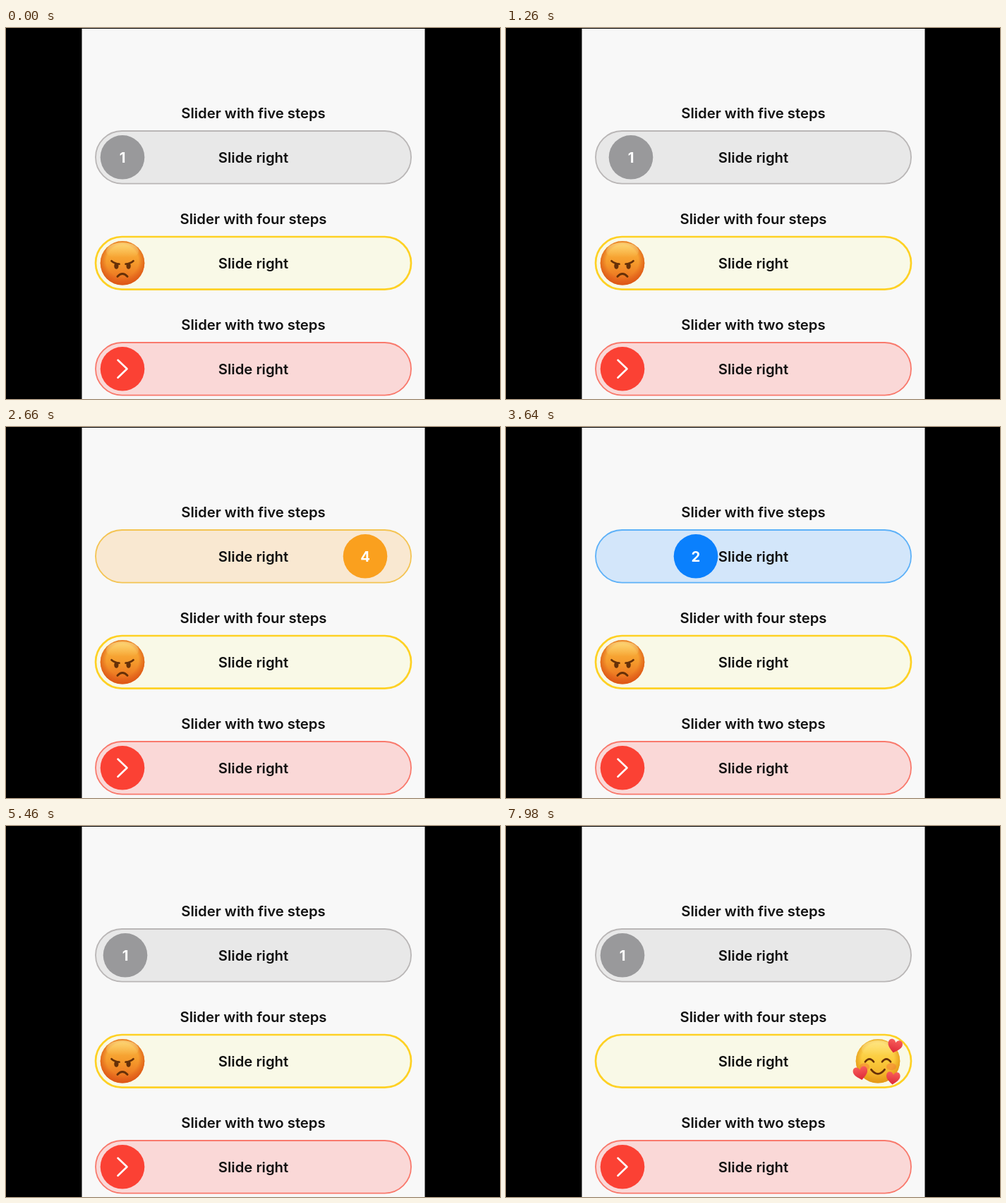
An HTML page with a canvas that plays this animation: 700x526 px, repeating every 8 s.

```html
<!DOCTYPE html>
<html lang="en">
<head>
<meta charset="utf-8">
<title>Step sliders</title>
<style>
  html, body { margin: 0; width: 100%; height: 100%; overflow: hidden; background: #000; }
  canvas { display: block; width: 700px; height: 526px; }
</style>
</head>
<body>
<canvas id="stage" width="700" height="526"></canvas>
<script>
const ctx = document.getElementById('stage').getContext('2d');
const LOOP = 8000, TICK = 140;
const START = 165, END = 536, RADIUS = 31.3;
const TAU = Math.PI * 2;
const BROWN = '#663008';

// [time in ms, knob centre x]
const numberPath = [
  [1120, 165], [1260, 177], [1400, 216], [1680, 350], [1960, 497], [2100, 536],
  [2240, 536], [2380, 532], [2520, 523], [2660, 509], [3640, 269],
  [4060, 215], [4620, 186], [5460, 169], [5600, 165]
];
const facePath = [
  [6440, 165], [6580, 186], [6720, 250], [6860, 319], [7280, 420], [7700, 497], [7980, 527]
];

const numberSteps = [
  { knob: '#99999b', fill: '#e8e8e8', edge: '#b9b6b6' },
  { knob: '#0a80fd', fill: '#d3e6fa', edge: '#5db1f8' },
  { knob: '#34c759', fill: '#d9f1df', edge: '#78d890' },
  { knob: '#faa01e', fill: '#f9e8d1', edge: '#f4c453' },
  { knob: '#fb4134', fill: '#fad8d7', edge: '#f9796c' }
];

function along(path, t) {
  if (t <= path[0][0]) return path[0][1];
  for (let i = 1; i < path.length; i++) {
    const [t0, x0] = path[i - 1], [t1, x1] = path[i];
    if (t <= t1) return x0 + (x1 - x0) * (t - t0) / (t1 - t0);
  }
  return path[path.length - 1][1];
}

const stepAt = (x, count) => Math.floor((x - START) / (END - START) * (count - 1));

function text(str, x, y, color = '#111', weight = 600) {
  ctx.font = `${weight} 20.3px Inter, sans-serif`;
  ctx.textAlign = 'center';
  ctx.fillStyle = color;
  ctx.fillText(str, x, y);
}

function disc(x, y, r, fill) {
  ctx.fillStyle = fill;
  ctx.beginPath();
  ctx.arc(x, y, r, 0, TAU);
  ctx.fill();
}

function oval(x, y, rx, ry, fill) {
  ctx.fillStyle = fill;
  ctx.beginPath();
  ctx.ellipse(x, y, rx, ry, 0, 0, TAU);
  ctx.fill();
}

// Quadratic stroke; a straight line when the control point is on it.
function curve(x0, y0, cx, cy, x1, y1, width, color = BROWN) {
  ctx.strokeStyle = color;
  ctx.lineWidth = width;
  ctx.lineCap = 'round';
  ctx.beginPath();
  ctx.moveTo(x0, y0);
  ctx.quadraticCurveTo(cx, cy, x1, y1);
  ctx.stroke();
}

function ball(top, middle, bottom, rim) {
  const body = ctx.createLinearGradient(0, -RADIUS, 0, RADIUS);
  body.addColorStop(0, top);
  body.addColorStop(0.5, middle);
  body.addColorStop(1, bottom);
  disc(0, 0, RADIUS, body);
  const shade = ctx.createRadialGradient(0, -3, RADIUS * 0.72, 0, -1, RADIUS + 1);
  shade.addColorStop(0, rim + '00');
  shade.addColorStop(1, rim + 'cc');
  disc(0, 0, RADIUS, shade);
  const gloss = ctx.createLinearGradient(0, -29, 0, -8);
  gloss.addColorStop(0, '#ffe99a99');
  gloss.addColorStop(1, '#ffe99a00');
  oval(0, -17, 23, 12, gloss);
}

function heart(x, y, size, angle) {
  ctx.save();
  ctx.translate(x, y);
  ctx.rotate(angle);
  ctx.scale(size, size);
  const red = ctx.createLinearGradient(0, -1, 0, 1);
  red.addColorStop(0, '#fa625c');
  red.addColorStop(1, '#dc2637');
  ctx.fillStyle = red;
  ctx.beginPath();
  ctx.moveTo(0, 0.95);
  ctx.bezierCurveTo(-0.5, 0.55, -1, 0.2, -1, -0.3);
  ctx.bezierCurveTo(-1, -1, -0.2, -1.05, 0, -0.45);
  ctx.bezierCurveTo(0.2, -1.05, 1, -1, 1, -0.3);
  ctx.bezierCurveTo(1, 0.2, 0.5, 0.55, 0, 0.95);
  ctx.fill();
  ctx.restore();
}

function angryFace() {
  ball('#fbbd43', '#f59a2c', '#e8641d', '#da5314');
  for (const side of [-1, 1]) {
    oval(side * 8.6, 4, 3.1, 4.4, BROWN);
    curve(side * 15.5, -3, side * 11, 1, side * 4.5, 1.4, 2.7);
  }
  curve(-7, 19, 0, 11.5, 7, 19, 3);
}

function neutralFace() {
  ball('#fde26a', '#fbcb3a', '#eda31d', '#e29414');
  for (const side of [-1, 1]) oval(side * 9.8, -6.5, 3.4, 5, BROWN);
  curve(-14.5, 10, 0, 10, 14.5, 10, 2.8);
}

function lovingFace() {
  ball('#fde064', '#fbca3b', '#eda421', '#e29414');
  for (const side of [-1, 1]) {
    oval(side * 19, 8, 7, 5, '#f37a3580');
    curve(side * 18, 1, side * 12, -7, side * 6, 1, 2.7);
  }
  curve(-9.5, 12, 0, 24, 9.5, 12, 2.8);
  heart(24, -21.5, 10.3, 0.25);
  heart(-24.5, 17, 10.3, -0.2);
  heart(21.5, 24, 9.8, 0.1);
}

const faces = [angryFace, neutralFace, lovingFace, lovingFace];

function slider(title, y, fill, edge, width) {
  text(title, 350.5, y - 55.5);
  ctx.beginPath();
  ctx.roundRect(127, y - 37.3, 447, 74.6, 37.3);
  ctx.fillStyle = fill;
  ctx.fill();
  ctx.strokeStyle = edge;
  ctx.lineWidth = width;
  ctx.stroke();
  text('Slide right', 350.5, y + 7.5);
}

function numberSlider(t) {
  const y = 183.3, x = along(numberPath, t);
  const step = stepAt(x, numberSteps.length);
  const { knob, fill, edge } = numberSteps[step];
  slider('Slider with five steps', y, fill, edge, 1.8);
  disc(x, y, RADIUS, knob);
  text(step + 1, x, y + 7.5, '#fff', 650);
}

function faceSlider(t) {
  const y = 333.3, x = along(facePath, t);
  slider('Slider with four steps', y, '#f9f9e7', '#fed124', 2.7);
  ctx.save();
  ctx.translate(x, y);
  faces[stepAt(x, faces.length)]();
  ctx.restore();
}

function arrowSlider() {
  const y = 483.3;
  slider('Slider with two steps', y, '#fad8d7', '#f9796c', 1.8);
  disc(START, y, RADIUS, '#fb4134');
  ctx.strokeStyle = '#fff';
  ctx.lineWidth = 2.6;
  ctx.lineCap = ctx.lineJoin = 'round';
  ctx.beginPath();
  ctx.moveTo(158.5, y - 12.5);
  ctx.lineTo(171.5, y);
  ctx.lineTo(158.5, y + 12.5);
  ctx.stroke();
}

function draw(now) {
  const t = Math.floor(now % LOOP / TICK) * TICK;
  ctx.fillStyle = '#000';
  ctx.fillRect(0, 0, 700, 526);
  ctx.fillStyle = '#f8f8f8';
  ctx.fillRect(107.5, 1, 486, 525);
  numberSlider(t);
  faceSlider(t);
  arrowSlider();
}

let origin;
function frame(now) {
  origin ??= now;
  draw(now - origin);
  requestAnimationFrame(frame);
}
draw(0);
requestAnimationFrame(frame);
</script>
</body>
</html>
```
